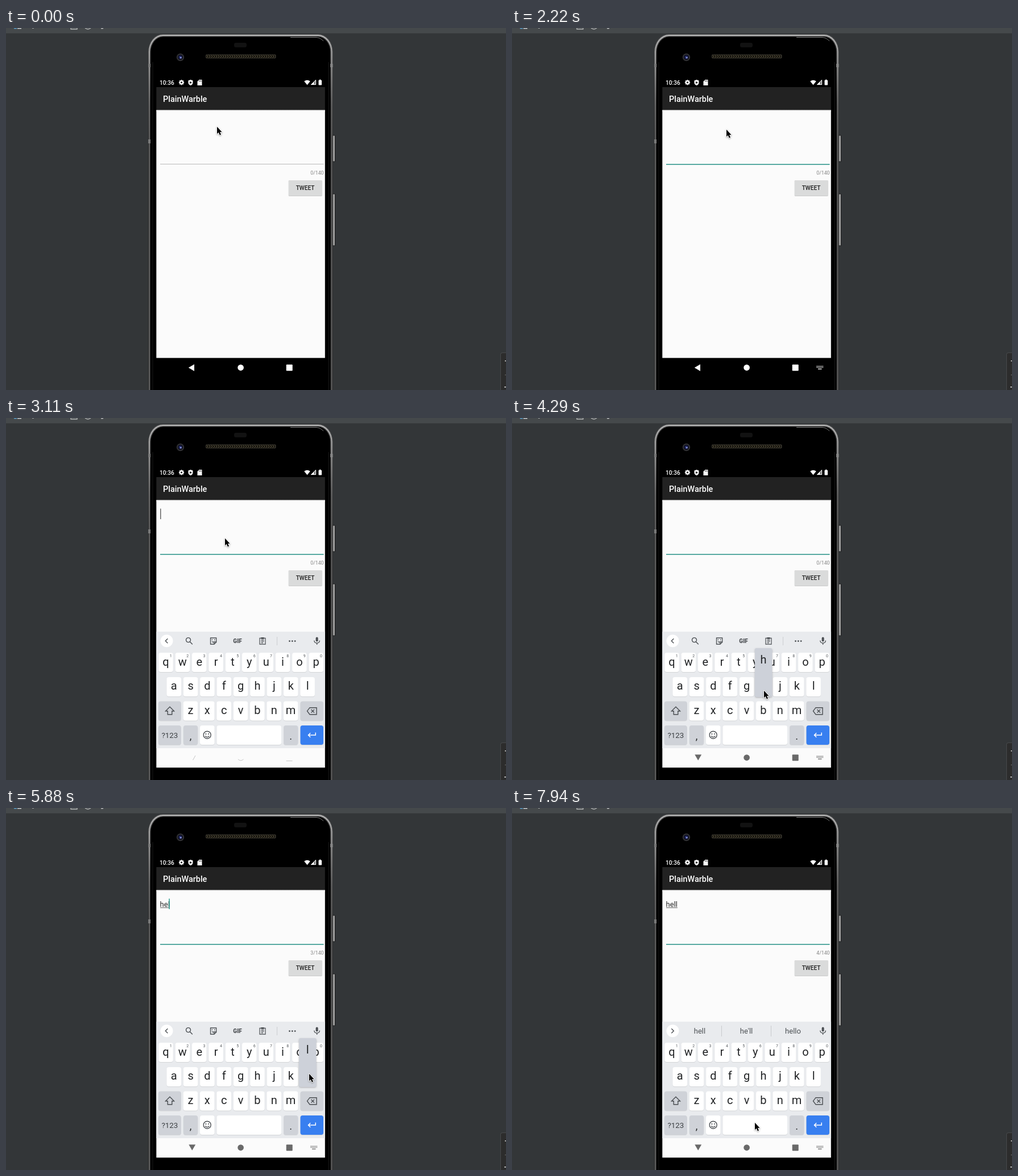
Recreate the animation shown at these times as an HTML page with a canvas. Size 879 by 637 pixels, loop 8 s.

```html
<!DOCTYPE html>
<html lang="en">
<head>
<meta charset="utf-8">
<title>Phone typing demo</title>
<style>
  html, body { margin: 0; width: 100%; height: 100%; overflow: hidden; background: #333638; }
  canvas { display: block; }
</style>
</head>
<body>
<canvas id="stage" width="879" height="637"></canvas>
<script>
const ctx = document.getElementById('stage').getContext('2d');
const LOOP = 8000;
const FONT = 'Roboto, "Noto Sans", sans-serif';

const TICKS = [0, 150, 300, 450, 600, 900, 1050, 1190, 1340, 1480, 1630, 2080, 2220, 2520, 2670,
  3110, 3260, 3400, 3550, 3690, 3840, 4290, 4440, 4580, 4730, 4870, 5010, 5160, 5300, 5440,
  5590, 5740, 5880, 6030, 6320, 6470, 6610, 6760, 7050, 7200, 7500, 7650, 7790, 7940];

// Pointer moves: start, end, x, y
const MOVES = [
  [0, 600, 377, 178], [2670, 3110, 385, 211], [3110, 3840, 443, 479], [4440, 5010, 338, 427],
  [5440, 5740, 531, 480], [5740, 5880, 533, 467], [6470, 6760, 521, 431],
  [6760, 7200, 515, 428], [7200, 7940, 427, 553]
];
const TYPED = [[0, ''], [4440, 'h'], [5440, 'he'], [5880, 'hel'], [6470, 'hell']];
const PRESSES = [[4290, 4580, 'h'], [5010, 5440, 'e'], [5740, 6030, 'l'], [6320, 6610, 'l']];
const CARET_ON = [[600, 1050], [1630, 2220], [3110, 3690], [4440, 5010], [5440, 7050]];

const within = (t, [a, b]) => t >= a && t < b;
const lastBefore = (list, t) => list.filter(e => e[0] <= t).pop();

// ---- drawing helpers ----
function rect(x, y, w, h, fill) {
  ctx.fillStyle = fill;
  ctx.fillRect(x, y, w, h);
}
function round(x, y, w, h, r, fill) {
  ctx.fillStyle = fill;
  ctx.beginPath();
  ctx.roundRect(x, y, w, h, r);
  ctx.fill();
}
function disc(x, y, r, fill) {
  ctx.fillStyle = fill;
  ctx.beginPath();
  ctx.arc(x, y, r, 0, Math.PI * 2);
  ctx.fill();
}
function poly(points, fill) {
  ctx.fillStyle = fill;
  ctx.beginPath();
  points.forEach(([x, y]) => ctx.lineTo(x, y));
  ctx.closePath();
  ctx.fill();
}
function stroke(d, color, width = 1.4, x = 0, y = 0) {
  ctx.save();
  ctx.translate(x, y);
  ctx.strokeStyle = color;
  ctx.lineWidth = width;
  ctx.stroke(new Path2D(d));
  ctx.restore();
}
function fillPath(d, color, x = 0, y = 0) {
  ctx.save();
  ctx.translate(x, y);
  ctx.fillStyle = color;
  ctx.fill(new Path2D(d), 'evenodd');
  ctx.restore();
}
function text(s, x, y, size, color, align = 'left', weight = 400) {
  ctx.font = `${weight} ${size}px ${FONT}`;
  ctx.textAlign = align;
  ctx.fillStyle = color;
  ctx.fillText(s, x, y);
}
function gradient(x0, y0, x1, y1, ...colors) {
  const g = ctx.createLinearGradient(x0, y0, x1, y1);
  colors.forEach((c, i) => g.addColorStop(i / (colors.length - 1), c));
  return g;
}

// ---- desktop and phone shell ----
function drawDesktop() {
  rect(0, 0, 879, 637, '#333638');
  rect(0, 0, 879, 9, '#45494b');
  rect(0, 9, 879, 1, '#3a3d3f');
  rect(14, 0, 5, 1.5, '#5b9bc4');
  rect(20, 0, 7, 1.5, '#c8cacc');
  rect(46, 0, 3, 1, '#9a9c9e');
  stroke('M114 0V2H125V0M139 0Q144 4 149 0', '#b4b6b8', 1.3);
  rect(167, 0, 4, 1.5, '#b4b6b8');
  round(869, 571, 20, 80, 4, '#47494b');
  round(870, 572, 20, 80, 3, '#2c2c2c');
  rect(877, 585, 2, 1.5, '#d0d0d0');
  rect(877, 610, 2, 1, '#6a6a6a');
  rect(876, 631, 3, 1.5, '#d0d0d0');
}

function drawSideButton(y, h) {
  round(573, y - .5, 6, h + 1, 1.5, '#1c1c1c');
  rect(574.5, y + .5, 3.5, h - 1, gradient(574, 0, 578, 0, '#6a6a6a', '#a8a8a8', '#9a9a9a'));
}

// One layer of the phone body, inset from the outer edge
function bodyLayer(inset, fill) {
  const corner = { x: 26 - inset, y: 31 - inset };
  round(250 + inset, 11 + inset, 324.5 - inset * 2, 700, corner, fill);
}

function drawShell() {
  drawSideButton(189, 46);
  drawSideButton(292, 91);
  bodyLayer(0, gradient(0, 11, 0, 200, '#666', '#3c3c3c', '#2a2a2a'));
  bodyLayer(1, gradient(0, 11, 0, 200, '#b8b8b8', '#949494', '#6c6c6c', '#626262'));
  bodyLayer(3, gradient(0, 11, 0, 130, '#505050', '#3a3a3a', '#1c1c1c'));
  bodyLayer(4.5, '#000');
  rect(257.5, 60, 1, 577, '#191919');
  rect(567, 60, 1, 577, '#191919');
  stroke('M500 16.5H545Q553 17 558 23', '#777', 1);
  rect(250, 63, 4, 6, '#777');
  rect(570, 63, 4.5, 6, '#858585');
  rect(250, 196, 4, 7, '#777');
  round(401, 26, 22, 8, 3, '#121212');
  disc(306.5, 51.5, 6.7, '#303033');
  disc(306.5, 51.5, 4.5, '#0d0e1d');
  disc(306.5, 51.5, 2.8, '#28306e');
  disc(307.3, 52.3, 1.2, '#a4b0ec');

  round(351, 46.5, 123.5, 7, 2, '#3b3831');
  ctx.save();
  ctx.beginPath();
  ctx.rect(352, 47.5, 121, 5);
  ctx.clip();
  rect(352, 47, 121, 6, '#17150f');
  for (let x = 352; x < 476; x += 4) stroke('M0 47L3 50L0 53', '#59533f', 1, x);
  ctx.restore();
}

// ---- app screen ----
function drawStatusBar() {
  text('10:36', 270, 99.8, 10.1, '#fff', 'left', 500);
  for (let i = 0; i < 8; i++) {
    ctx.save();
    ctx.translate(308.5, 95.8);
    ctx.rotate(i * Math.PI / 4);
    rect(-1, -4.6, 2, 3, '#fff');
    ctx.restore();
  }
  disc(308.5, 95.8, 3.5, '#fff');
  disc(308.5, 95.8, 1.4, '#000');
  fillPath('M0-5L4-3.4V0Q4 3.5 0 5Q-4 3.5-4 0V-3.4Z', '#fff', 324.5, 96);
  poly([[323, 94], [327, 96], [323, 98]], '#000');
  fillPath('M-1-5H4V5H-4V-2Z', '#fff', 340.5, 96);
  [339, 340.8, 342.6].forEach(x => rect(x, 92.3, .8, 2, '#000'));
  fillPath('M0 4.5L-5.3-2Q0-6 5.3-2Z', '#fff', 529.5, 95.8);
  poly([[536, 100], [545, 91], [545, 100]], '#777');
  stroke('M536.5 99.6H544.6V91.6Z', '#fff', 1);
  poly([[536, 100], [541.5, 94.5], [541.5, 100]], '#fff');
  round(549.5, 91.7, 5.5, 8.8, .8, '#fff');
  rect(551, 90.7, 2.5, 1.2, '#fff');
}

function drawApp(t) {
  rect(264.3, 104, 296.5, 41, '#222');
  text('PlainWarble', 276, 130, 14.43, '#fff', 'left', 500);
  rect(264.3, 144.5, 296.5, 436.1, '#fbfbfb');
  rect(264.3, 144.5, 296.5, 2, gradient(0, 144.5, 0, 146.5, '#dcdcdc', '#fbfbfb'));

  const focused = t >= 300;
  if (focused) rect(271, 239, 287.5, 2, '#58aaa2');
  else rect(271, 239, 287.5, 1, '#b9b9b9');

  const typed = lastBefore(TYPED, t)[1];
  text(`${typed.length}/140`, 558.5, 258, 8.75, '#858585', 'right');
  round(496.7, 268, 59, 28, 1.5, '#cbcccc');
  round(497, 268, 58.5, 27, 1.5, '#dadbdb');
  text('TWEET', 526, 285.4, 10.1, '#1e1e1e', 'center', 500);

  text(typed, 270.6, 173.7, 13, '#2b2b2b');
  const width = typed ? ctx.measureText(typed).width : 0;
  if (typed) rect(271, 175, width - .5, 1, '#666');
  if (CARET_ON.some(span => within(t, span))) {
    const color = within(t, [2080, 2220]) || within(t, [3110, 3260]) ? '#666' : '#27998d';
    const x = typed ? 270.6 + width - 1.5 : 271;
    rect(x, 159.5, 1.5, 18.5, color);
  }
}

// ---- keyboard ----
const ROWS = [['qwertyuiop', 281, 413, 436], ['asdfghjkl', 295.2, 456, 478.3], ['zxcvbnm', 324.4, 498.5, 521]];
const PITCH = 29.36;
const LIGHT = '#fff', DARK = '#cfd2d8', INK = '#222426', ICON = '#4a4e52';

function keycap(x, y, w, fill) {
  round(x, y + 1, w, 34, 4, '#d3d5d8');
  round(x, y, w, 34, 4, fill);
}

function drawMic() {
  round(544.6, 385.5, 4, 8, 2, ICON);
  stroke('M541.8 391.5Q542 396 546.6 396Q551.2 396 551.4 391.5M546.6 396V399', ICON, 1.3);
}

function drawStrip(suggesting) {
  disc(282.5, 392.3, 11, '#fff');
  stroke(suggesting ? 'M-2-4L2 0L-2 4' : 'M2-4L-2 0L2 4', ICON, 1.4, 282.3, 392.3);
  drawMic();
  if (suggesting) {
    ['hell', "he'll", 'hello'].forEach((word, i) => text(word, 330 + i * 82, 397, 13, '#4c5054', 'center'));
    rect(368, 383, 1, 19, '#c9cbce');
    rect(455, 383, 1, 19, '#c9cbce');
    return;
  }
  stroke('M4.2 0A4 4 0 1 1-3.8 0A4 4 0 1 1 4.2 0M2.8 3L7.5 7.7', ICON, 1.4, 320.3, 390.6);
  stroke('M-5-5.5H5.2V2L1.5 5.5H-5ZM5 1.5H1.3V5.3M-2.5 .8Q-.5 3 1.5 1', ICON, 1.3, 364.5, 392.5);
  rect(361.5, 389.5, 1.6, 1.6, ICON);
  rect(366, 389.5, 1.6, 1.6, ICON);
  text('GIF', 407, 396, 10, ICON, 'center', 900);
  stroke('M-5-4.8H5V6H-5ZM-2.5-1.5H2.5M-2.5 1H2.5M-2.5 3.4H1', ICON, 1.2, 451, 392.2);
  rect(448.5, 386, 5, 3, ICON);
  rect(476, 385, 1, 15, '#cdcfd2');
  [498.5, 503.3, 508.1].forEach(x => disc(x, 392.6, 1.4, ICON));
}

function drawPopup(letter) {
  const [keys, x0, top, base] = ROWS.find(r => r[0].includes(letter));
  const x = x0 + keys.indexOf(letter) * PITCH;
  ctx.save();
  ctx.shadowColor = 'rgba(0,0,0,.25)';
  ctx.shadowBlur = 3;
  ctx.shadowOffsetY = 1;
  round(x - 15, top - 51, 30.3, 86, 3, '#cdd1d9');
  ctx.restore();
  text(letter, x, base - 46, 20, INK, 'center');
  if (letter === 'e') [344.5, 347, 349.5].forEach(d => rect(d, 397, 1, 1, '#444'));
}

function drawKeyboard(t) {
  const slide = t < 2670 ? 110 : 0;
  ctx.save();
  ctx.beginPath();
  ctx.rect(264.3, 361, 296.5, 220);
  ctx.clip();
  ctx.translate(0, slide);
  rect(264, 376, 297, 205, '#e9ebee');
  drawStrip(t >= 6610);

  ROWS.forEach(([keys, x0, top, base], row) => [...keys].forEach((key, i) => {
    const x = x0 + i * PITCH;
    keycap(x - 12.8, top, 25.6, LIGHT);
    text(key, x, base, 20, INK, 'center');
    if (row === 0) text((i + 1) % 10, x + 8.8, 421.3, 7, '#55595d', 'center');
  }));

  keycap(267.8, 498.5, 40, DARK);
  stroke('M0-7L7.5 .5H3.8V6.5H-3.8V.5H-7.5Z', ICON, 1.4, 288, 515.3);
  keycap(517.5, 498.5, 40.5, DARK);
  stroke('M-8.5 0L-4-6H8V6H-4ZM-1.5-2.8L4 2.8M4-2.8L-1.5 2.8', ICON, 1.4, 538, 515.7);

  keycap(267.8, 541, 40, DARK);
  text('?123', 287.8, 562.5, 13.3, '#3c4043', 'center');
  keycap(311.8, 541, 25.4, DARK);
  text(',', 324.5, 565.5, 18, INK, 'center');
  keycap(341, 541, 25.6, LIGHT);
  stroke('M6.5 0A6.5 6.5 0 1 1-6.5 0A6.5 6.5 0 1 1 6.5 0M-3.5 1.8Q0 6 3.5 1.8', ICON, 1.4, 353.7, 557.7);
  disc(351.4, 556, 1.1, ICON);
  disc(356, 556, 1.1, ICON);
  keycap(370.5, 541, 113.5, LIGHT);
  keycap(488, 541, 25.4, DARK);
  text('.', 500.7, 565.8, 18, INK, 'center');
  keycap(517.5, 541, 40.5, '#387ff0');
  stroke('M6.5-4V.5H-6M-2.5-3.2L-6.2 .5L-2.5 4.2', '#fff', 1.5, 537.7, 557.5);

  const press = PRESSES.find(p => within(t, p));
  if (press) drawPopup(press[2]);
  ctx.restore();
}

// ---- navigation bar ----
function drawKeyboardIcon(color) {
  for (let row = 0; row < 2; row++)
    for (let i = 0; i < 6; i++) rect(535.3 + i * 2.1, 594.5 + row * 2.2, 1.3, 1.3, color);
  rect(538, 599.4, 6.5, 1.3, color);
}

function drawNav(t) {
  const light = t >= 3110;
  if (light) rect(264.3, 580, 296.5, 35.2, '#fbfbfb');
  if (within(t, [3110, 3260])) {
    stroke('M333 594L328.5 602M408 600.5Q412.5 605 417.5 600.5M492.5 603.3H503.5', '#c6c6c6', 1);
    return;
  }
  const color = light ? '#696969' : '#fff';
  if (t >= 2670) poly([[321.3, 592.3], [333.2, 592.3], [327.2, 602.5]], color);
  else poly([[320.8, 597.8], [331, 591.8], [331, 603.8]], color);
  disc(412.6, 597.6, 5.3, color);
  round(492.7, 592.2, 11, 11, 1, color);
  if (t >= 1340) drawKeyboardIcon(color);
}

// ---- pointer ----
function pointerAt(t) {
  let x = 371, y = 173;
  for (const [start, end, tx, ty] of MOVES) {
    const p = Math.min(1, Math.max(0, (t - start) / (end - start)));
    const e = p * p * (3 - 2 * p);
    x += (tx - x) * e;
    y += (ty - y) * e;
  }
  return [x, y];
}

function drawPointer(t) {
  const [x, y] = pointerAt(t);
  const shape = new Path2D('M0 0V12.6L2.8 10L4.8 14.8L7 13.8L5 9.2H8.6Z');
  ctx.save();
  ctx.translate(x, y + .7);
  ctx.lineJoin = 'round';
  ctx.shadowColor = 'rgba(0,0,0,.35)';
  ctx.shadowBlur = 2.5;
  ctx.shadowOffsetY = 1;
  ctx.strokeStyle = '#fff';
  ctx.lineWidth = 1.8;
  ctx.stroke(shape);
  ctx.shadowColor = 'transparent';
  ctx.fillStyle = '#000';
  ctx.fill(shape);
  ctx.restore();
}

function draw(now) {
  const time = (now + .5) % LOOP;
  const t = TICKS.filter(tick => tick <= time).pop();
  drawDesktop();
  drawShell();
  drawStatusBar();
  drawApp(t);
  drawNav(t);
  if (t >= 2520) drawKeyboard(t);
  drawPointer(t);
}

const start = performance.now();
function loop() {
  draw(performance.now() - start);
  requestAnimationFrame(loop);
}
loop();
</script>
</body>
</html>
```
